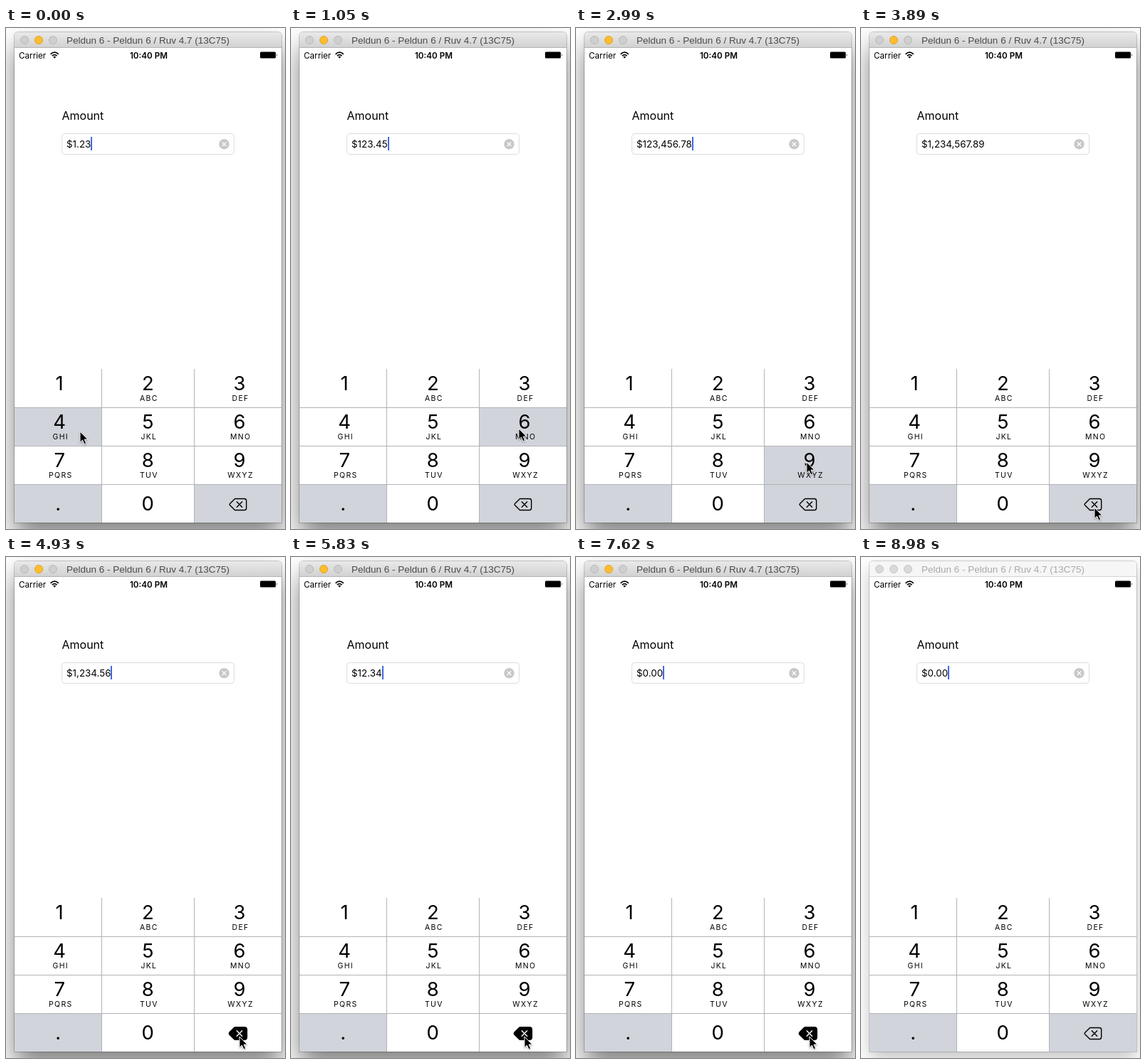
An HTML page that plays this animation: 392x704 px, repeating every 9080 ms.

```html
<!DOCTYPE html>
<html lang="en">
<head>
<meta charset="utf-8">
<title>Amount field</title>
<style>
  html, body { margin: 0; width: 100%; height: 100%; overflow: hidden; background: #fff; }
  #stage { position: relative; width: 392px; height: 704px; overflow: hidden; }
  #win {
    position: absolute; left: 12px; top: 6px; width: 375px; height: 689px;
    border-radius: 5px 5px 0 0; background: #fff;
    box-shadow: 0 0 0 1px rgba(0,0,0,.2), 0 20px 36px rgba(0,0,0,.5);
  }
  #bar {
    height: 21px; border-radius: 5px 5px 0 0; border-bottom: 1px solid #b4b4b4;
    background: linear-gradient(#e9e9e9, #d2d2d2);
  }
  .idle #win { box-shadow: 0 0 0 1px rgba(0,0,0,.16), 0 10px 24px rgba(0,0,0,.24); }
  .idle #bar { background: #f6f6f6; border-color: #d4d4d4; }
  svg { position: absolute; left: 0; top: 0; }
  text { font-family: Inter, sans-serif; fill: #000; }
  .mid { text-anchor: middle; }
  #title { font: 13.5px "Liberation Sans", Arial, sans-serif; fill: #4a4a4a; }
  .idle #title { fill: #a9a9a9; }
  .light { fill: #cfcfcf; stroke: #b9b9b9; }
  .light.amber { fill: #fdbd2e; stroke: #e0a128; }
  .idle .light { fill: #d9d9d9; stroke: #c6c6c6; }
  .digit { font-size: 27.5px; }
  .abc { font-size: 10.5px; letter-spacing: 1.3px; }
  .key { fill: #fff; }
  .key.side, .key.down { fill: #d1d4db; }
  .key.side.down { fill: #fff; }
  #erase { fill: none; stroke: #000; stroke-width: 1.4; stroke-linejoin: round; stroke-linecap: round; }
  #erase.down .body { fill: #000; stroke-width: 3; }
  #erase.down .cross { stroke: #fff; }
  #arrow { filter: drop-shadow(0 1px 1px rgba(0,0,0,.35)); }
</style>
</head>
<body>
<div id="stage">
  <div id="win"><div id="bar"></div></div>
  <svg width="392" height="704" viewBox="0 0 392 704">
    <circle class="light" cx="26" cy="17" r="5.5"/>
    <circle class="light amber" cx="46" cy="17" r="5.5"/>
    <circle class="light" cx="66" cy="17" r="5.5"/>
    <text id="title" class="mid" x="199.5" y="22">Peldun 6 - Peldun 6 / Ruv 4.7 (13C75)</text>

    <text x="18" y="42.5" font-size="11.7">Carrier</text>
    <g fill="none" stroke="#000" stroke-width="1.7">
      <path d="M62.6 36.8Q68.2 31.6 73.8 36.8"/>
      <path d="M64.8 39.2Q68.2 36 71.6 39.2"/>
      <path d="M68.2 42.8l-2-2.2Q68.2 39 70.2 40.6Z" fill="#000" stroke="none"/>
    </g>
    <text class="mid" x="200.5" y="42.5" font-size="11.7" font-weight="600">10:40 PM</text>
    <rect x="357" y="33.5" width="22" height="9" rx="1.5"/>
    <path d="M380 36.2q1.8 1.8 0 3.6Z"/>

    <text x="78.5" y="129" font-size="16">Amount</text>
    <rect x="78.5" y="148.5" width="242" height="29" rx="4" fill="#fff" stroke="#dcdcdc"/>
    <text id="amount" x="85" y="167.8" font-size="13.4"></text>
    <rect id="caret" y="153" width="2" height="19" fill="#4169e1"/>
    <circle cx="306.5" cy="163.2" r="7.2" fill="#c8c8cb"/>
    <path d="M303.7 160.4l5.6 5.6m0-5.6l-5.6 5.6" stroke="#fff" stroke-width="1.3"/>

    <g id="pad"></g>
    <path d="M12 533.5H387M12 587.5H387M12 641.5H387M134.5 479V695M264.5 479V695" stroke="#b2b3b7" fill="none"/>
    <g id="erase">
      <path class="body" d="M321.6 661.5H335Q337.7 661.5 337.7 664.2V674.8Q337.7 677.5 335 677.5H321.6L314.5 670.4Q313.8 669.5 314.5 668.6Z"/>
      <path class="cross" d="M324.3 665.8l7.4 7.4m0-7.4l-7.4 7.4"/>
    </g>
    <path id="arrow" d="M0 0V15.4L3.5 12.1L6 17.8L8.7 16.6L6.2 11.1H11Z" stroke="#fff" stroke-width="1"/>
  </svg>
</div>
<script>
const LOOP = 9080, BLUR_AT = 8980;
const $ = id => document.getElementById(id);
const stage = $('stage'), amount = $('amount'), caret = $('caret'), erase = $('erase'), arrow = $('arrow');

function add(tag, attrs, text = '') {
  const el = document.createElementNS('http://www.w3.org/2000/svg', tag);
  for (const name in attrs) el.setAttribute(name, attrs[name]);
  el.textContent = text;
  $('pad').append(el);
  return el;
}

// Keypad
const LABELS = ['1', '2 ABC', '3 DEF', '4 GHI', '5 JKL', '6 MNO', '7 PQRS', '8 TUV', '9 WXYZ', '.', '0', ''];
const EDGES = [12, 134, 264, 387], CENTERS = [75.2, 199.3, 328];
const keys = {};
LABELS.forEach((label, i) => {
  const col = i % 3, y = 479 + 54 * Math.floor(i / 3), last = i > 8;
  const [digit, abc] = label.split(' ');
  const x = digit === '.' ? 73.3 : CENTERS[col];
  keys[digit || 'del'] = add('rect', {
    class: last && col !== 1 ? 'key side' : 'key',
    x: EDGES[col], y, width: EDGES[col + 1] - EDGES[col], height: 54
  });
  add('text', { class: 'digit mid', x, y: y + (last ? 37 : 30) }, digit);
  if (abc) add('text', { class: 'abc mid', x: x + 1.6, y: y + 45 }, abc);
});

// [key, down, up]: digits enter on release, erase acts on touch
const presses = [
  [4, 0, 150], [5, 600, 750], [6, 1050, 1200], [7, 1800, 1950], [8, 2400, 2550], [9, 2850, 3000],
  ['del', 4040, 4340], ['del', 4480, 4780],
  ...[4930, 5380, 5830, 6280, 6730, 7180, 7620].map(t => ['del', t, t + 150])
];

// Pointer way points: [time, x, y]
const route = [
  [0, 104, 567], [150, 104, 567], [600, 213, 566], [750, 213, 566], [1050, 320, 563], [1200, 320, 563],
  [1800, 96, 613], [1950, 96, 613], [2250, 201, 607], [2550, 201, 607], [2850, 324, 610], [3000, 324, 610],
  [3290, 330, 685], [3890, 328, 674], [7920, 328, 674], [8070, 333, 679], [8220, 341, 687], [8370, 350, 740]
];

function pointer(t) {
  // The pointer moves in steps of 150 ms
  const lag = t < 3290 ? 0 : t < 7620 ? 10 : 30;
  const s = Math.floor((t + lag) / 150) * 150 - lag;
  const i = route.findIndex(p => p[0] > s);
  if (i < 0) return route[route.length - 1].slice(1);
  const a = route[Math.max(0, i - 1)], b = route[i];
  const k = Math.max(0, (s - a[0]) / (b[0] - a[0]));
  return [a[1] + (b[1] - a[1]) * k, a[2] + (b[2] - a[2]) * k];
}

const money = cents => '$' + (cents / 100).toLocaleString('en-US', { minimumFractionDigits: 2, maximumFractionDigits: 2 });

function draw(t) {
  let cents = 123, edited = 0, held = null;
  for (const [key, down, up] of presses) {
    const erasing = key === 'del', at = erasing ? down : up;
    if (t >= at) {
      cents = erasing ? Math.floor(cents / 10) : cents * 10 + key;
      edited = at;
    }
    if (t >= down && t < up) held = String(key);
  }

  const text = money(cents);
  if (amount.textContent !== text) amount.textContent = text;
  caret.setAttribute('x', Math.round(85 + amount.getComputedTextLength()));
  const quiet = t - edited;
  caret.style.visibility = quiet >= 450 && quiet < 1050 ? 'hidden' : 'visible';

  for (const name in keys) keys[name].classList.toggle('down', name === held);
  erase.classList.toggle('down', held === 'del');
  arrow.setAttribute('transform', `translate(${pointer(t).map(Math.round)})`);
  stage.classList.toggle('idle', t >= BLUR_AT);
}

function tick() {
  draw(performance.now() % LOOP);
  requestAnimationFrame(tick);
}
tick();
</script>
</body>
</html>
```
